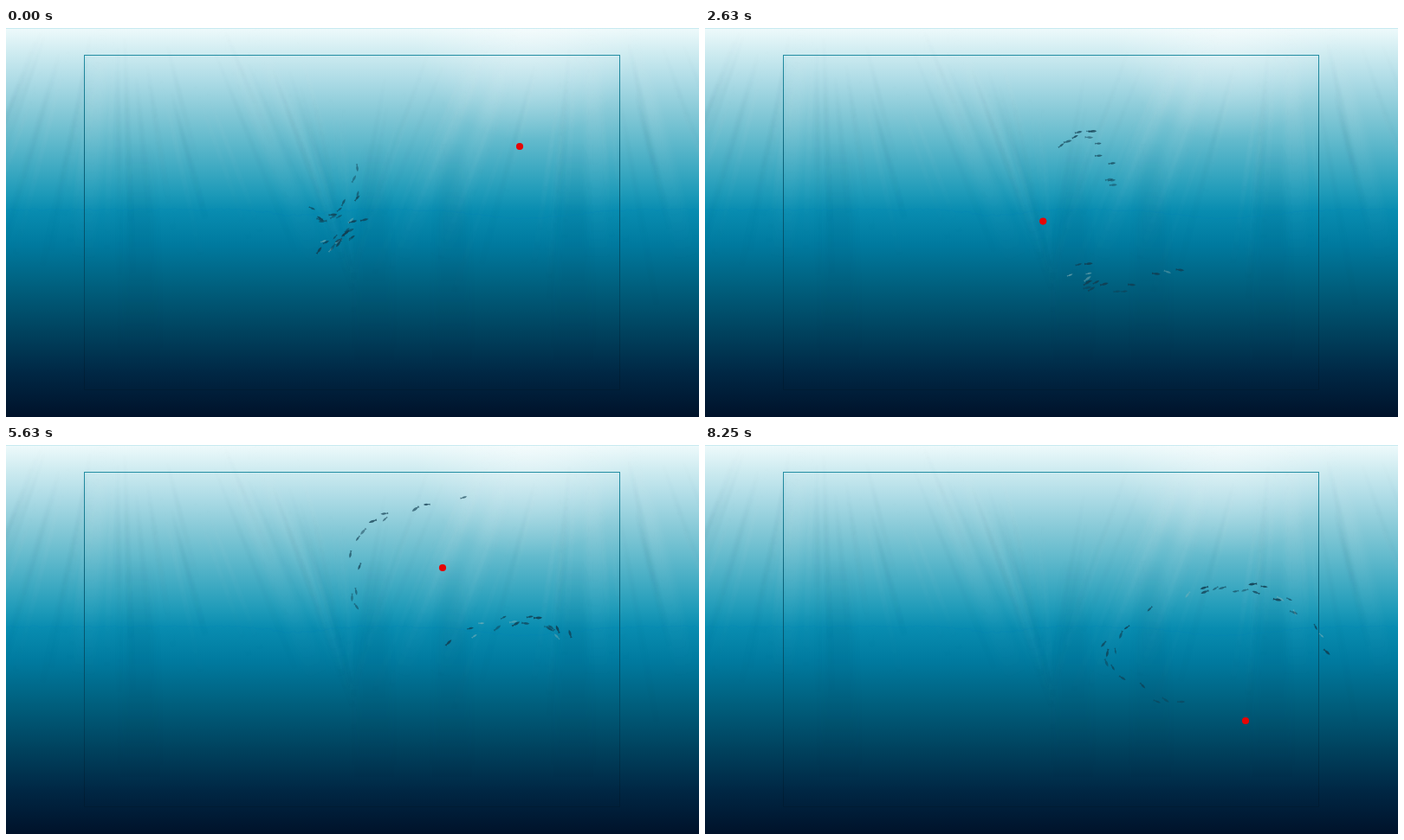
An HTML page with a canvas for the animation above (8.38 s loop, 800 by 450 pixels).

```html
<!DOCTYPE html>
<html lang="en">
<head>
<meta charset="utf-8">
<title>School of fish</title>
<style>
html, body { margin: 0; width: 100%; height: 100%; overflow: hidden; background: #00425e; }
canvas { display: block; width: 100vw; height: 100vh; }
</style>
</head>
<body>
<canvas id="stage" width="800" height="450"></canvas>
<script>
const W = 800, H = 450, LOOP = 8380, STEP = 125, LAST = 66;
const ctx = document.getElementById('stage').getContext('2d');

let seed = 7;
const random = () => (seed = (seed * 16807) % 2147483647) / 2147483647;
const between = (a, b) => a + (b - a) * random();
const clamp = (v, low, high) => Math.max(low, Math.min(high, v));

function verticalFill(g, stops) {
  const fill = g.createLinearGradient(0, 0, 0, H);
  stops.forEach(([y, color]) => fill.addColorStop(y / H, color));
  return fill;
}

// Sideways drift of the light per pixel of depth, across the stage.
const lean = x => 0.42 * Math.sin(Math.PI * (x - 130) / 270);

// A beam that widens downwards and fades at both ends.
function ray(g, x, y, length, width, slant, rgb, alpha) {
  const end = x + slant * length;
  const fill = g.createLinearGradient(x, y, end, y + length);
  fill.addColorStop(0, `rgba(${rgb},0)`);
  fill.addColorStop(0.35, `rgba(${rgb},${alpha})`);
  fill.addColorStop(1, `rgba(${rgb},0)`);
  g.fillStyle = fill;
  g.beginPath();
  g.moveTo(x - width / 2, y);
  g.lineTo(x + width / 2, y);
  g.lineTo(end + width, y + length);
  g.lineTo(end - width, y + length);
  g.fill();
}

function paintSea() {
  const sea = document.createElement('canvas');
  sea.width = W;
  sea.height = H;
  const g = sea.getContext('2d');
  g.fillStyle = verticalFill(g, [
    [0, '#eefafb'], [30, '#cdebf0'], [60, '#aedce6'], [100, '#83c8d6'], [150, '#4cb0c6'],
    [190, '#1f9bb9'], [212, '#088cb0'], [250, '#007a9f'], [300, '#005f7d'],
    [350, '#00435f'], [400, '#002744'], [450, '#00122a']
  ]);
  g.fillRect(0, 0, W, H);

  const sun = g.createRadialGradient(600, 0, 0, 600, 0, 130);
  sun.addColorStop(0, 'rgba(255,255,255,.4)');
  sun.addColorStop(1, 'rgba(255,255,255,0)');
  g.fillStyle = sun;
  g.fillRect(0, 0, W, H);

  g.filter = 'blur(4px)';
  for (const x of [112, 250, 285, 560, 590, 676, 722])
    ray(g, x, 0, 270, 14, lean(x), '255,255,255', 0.07);
  for (const x of [155, 425, 515, 655])
    ray(g, x, 130, 260, 24, 0, '0,45,75', 0.05);
  g.filter = 'blur(1px)';
  for (let i = 0; i < 80; i++) {
    const x = between(0, W);
    ray(g, x, between(0, 90), between(140, 260), 4, lean(x),
      i % 2 ? '255,255,255' : '0,70,100', between(0.015, 0.035));
  }
  g.filter = 'none';

  g.strokeStyle = 'rgba(0,130,185,.22)';
  g.beginPath();
  for (let x = 0; x <= W; x += 3) {
    const dip = 7 * Math.exp(-(((x - 335) / 38) ** 2)) + 10 * Math.exp(-(((x - 600) / 75) ** 2));
    g.lineTo(x, 210 + dip + between(-1.2, 1.2));
  }
  g.stroke();
  g.fillStyle = 'rgba(140,210,225,.4)';
  g.fillRect(0, 0, W, 1);

  g.strokeStyle = verticalFill(g, [[30, '#238ea3'], [150, '#0a6279'], [310, '#004660'], [410, '#001c33']]);
  g.strokeRect(90.5, 31.5, 618, 387);
  return sea;
}

// At each pose both schools lie along a curve through three points.
const poses = [
  { step: 0, dot: [593, 137], schools: [[345, 212, 385, 215, 410, 155], [362, 256, 385, 240, 408, 228]] },
  { step: 13, dot: [346, 223], schools: [[360, 210, 385, 140, 416, 190], [388, 250, 420, 302, 478, 284]] },
  { step: 28, dot: [469, 203], schools: [[470, 120, 500, 150, 535, 205], [500, 250, 470, 290, 640, 300]] },
  { step: 37, dot: [535, 133], schools: [[515, 68, 467, 115, 460, 155], [485, 265, 550, 278, 652, 260]] },
  { step: 45, dot: [504, 142], schools: [[520, 64, 413, 104, 413, 212], [510, 228, 600, 200, 646, 235]] },
  { step: 55, dot: [584, 169], schools: [[540, 91, 430, 152, 443, 220], [545, 262, 640, 165, 603, 97]] },
  { step: LAST, dot: [624, 319], schools: [[505, 193, 470, 255, 575, 310], [720, 240, 640, 165, 555, 187]] }
];

// Position and direction at t on the quadratic curve through three points.
function along([x0, y0, x1, y1, x2, y2], t) {
  const axis = (a, mid, b) => {
    const c = 2 * mid - (a + b) / 2, s = 1 - t;
    return [s * s * a + 2 * s * t * c + t * t * b, s * (c - a) + t * (b - c)];
  };
  const [x, dx] = axis(x0, x1, x2), [y, dy] = axis(y0, y1, y2);
  return { x, y, angle: Math.atan2(dy, dx) };
}

function makeFish(school, t) {
  const dx = between(-10, 10), dy = between(-8, 8), turn = between(-0.4, 0.4);
  const places = poses.map(p => along(p.schools[school], t));
  const keys = places.map(({ x, y, angle }, i) => {
    const from = places[Math.max(0, i - 1)], to = places[Math.min(places.length - 1, i + 1)];
    const ahead = (to.x - from.x) * Math.cos(angle) + (to.y - from.y) * Math.sin(angle);
    return { x: x + dx, y: y + dy, heading: angle + turn + (ahead < 0 ? Math.PI : 0) };
  });
  const pale = random() < 0.15;
  return { keys, color: pale ? '#8bb5b8' : '#123d50', alpha: between(0.4, 0.9), size: between(0.7, 1) };
}

const fish = [13, 18].flatMap((count, school) =>
  Array.from({ length: count }, (_, i) => makeFish(school, (i + random()) / count)));

function hermite(p, q, m, n, u) {
  const u2 = u * u, u3 = u2 * u;
  return (2 * u3 - 3 * u2 + 1) * p + (u3 - 2 * u2 + u) * m + (3 * u2 - 2 * u3) * q + (u3 - u2) * n;
}

function slope(p, q, m, n, u) {
  return 6 * (u * u - u) * (p - q) + (3 * u * u - 4 * u + 1) * m + (3 * u * u - 2 * u) * n;
}

function drawFish({ keys, color, alpha, size }, k, u) {
  const a = keys[k], b = keys[k + 1];
  const pull = 20 + 0.8 * Math.hypot(b.x - a.x, b.y - a.y);
  const x = [a.x, b.x, pull * Math.cos(a.heading), pull * Math.cos(b.heading), u];
  const y = [a.y, b.y, pull * Math.sin(a.heading), pull * Math.sin(b.heading), u];
  ctx.save();
  ctx.translate(hermite(...x), hermite(...y));
  ctx.rotate(Math.atan2(slope(...y), slope(...x)));
  ctx.scale(size, size);
  ctx.globalAlpha = alpha;
  ctx.fillStyle = color;
  ctx.beginPath();
  ctx.moveTo(5, 0);
  ctx.quadraticCurveTo(1, -2.6, -3, -0.5);
  ctx.lineTo(-5, -1.3);
  ctx.lineTo(-5, 1.3);
  ctx.lineTo(-3, 0.5);
  ctx.quadraticCurveTo(1, 2.6, 5, 0);
  ctx.fill();
  ctx.restore();
}

function drawDot(k, u) {
  const at = i => poses[clamp(i, 0, poses.length - 1)];
  const a = at(k), b = at(k + 1);
  const speed = (i, axis) => (at(i + 1).dot[axis] - at(i - 1).dot[axis]) / (at(i + 1).step - at(i - 1).step);
  const [x, y] = [0, 1].map(axis => {
    const span = b.step - a.step;
    return hermite(a.dot[axis], b.dot[axis], span * speed(k, axis), span * speed(k + 1, axis), u);
  });
  ctx.fillStyle = '#e60505';
  ctx.beginPath();
  ctx.arc(x, y, 4.1, 0, 2 * Math.PI);
  ctx.fill();
}

const sea = paintSea();

function draw(time) {
  const step = Math.min(LAST, Math.floor((time % LOOP) / STEP));
  let k = 0;
  while (k < poses.length - 2 && step >= poses[k + 1].step) k++;
  const u = (step - poses[k].step) / (poses[k + 1].step - poses[k].step);
  ctx.drawImage(sea, 0, 0);
  fish.forEach(f => drawFish(f, k, u));
  drawDot(k, u);
}

const start = performance.now();
function tick() {
  draw(performance.now() - start);
  requestAnimationFrame(tick);
}
tick();
</script>
</body>
</html>
```
